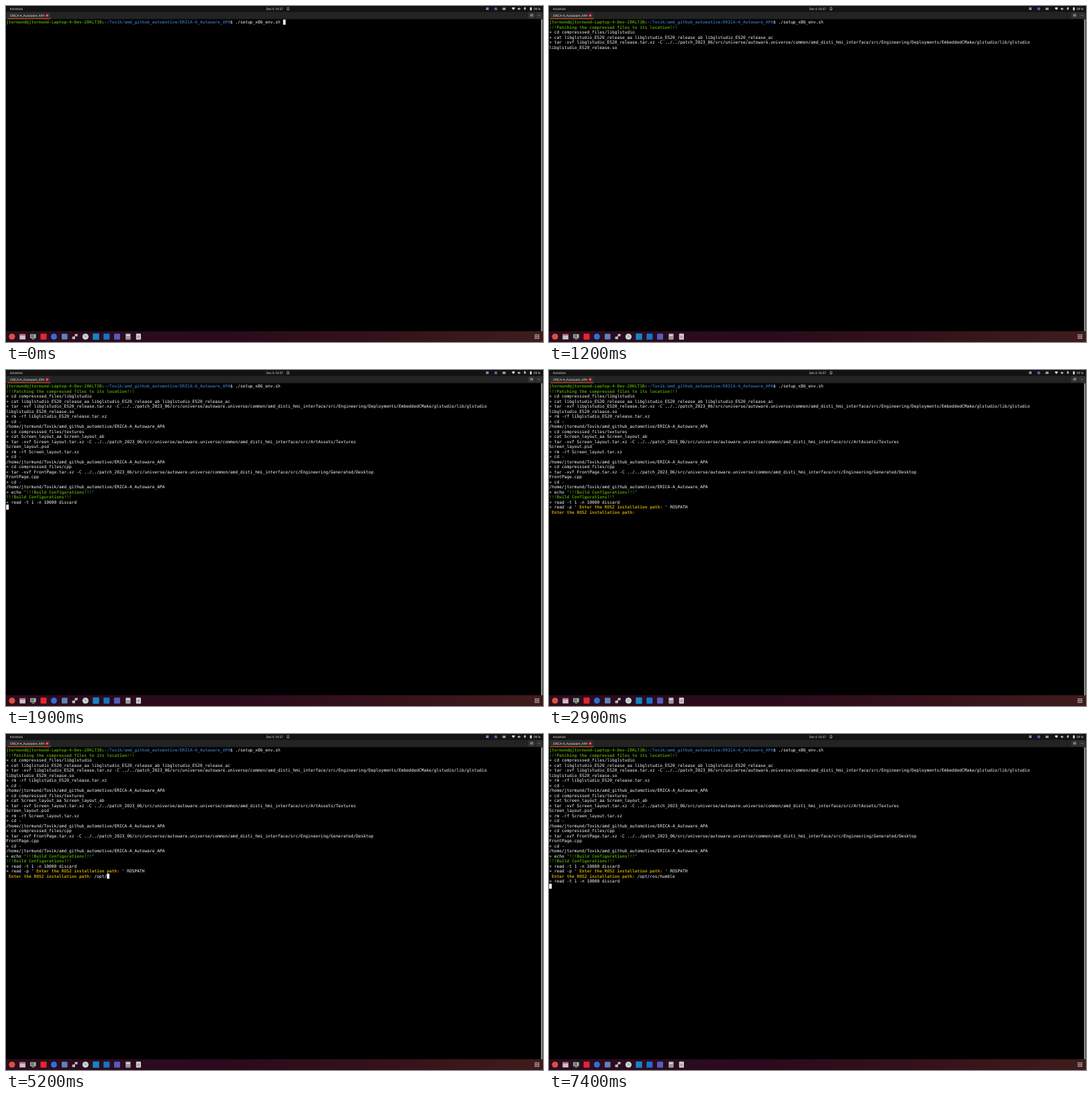
Animation of 800 by 500 pixels, one loop 8000 ms. Source, as an HTML page:

```html
<!DOCTYPE html>
<html lang="en">
<head>
<meta charset="utf-8">
<title>Terminal setup</title>
<style>
  html, body { margin: 0; width: 100%; height: 100%; overflow: hidden; background: #000; }
  svg { display: block; width: 100vw; height: 100vh; }
  text { white-space: pre; text-rendering: geometricPrecision; }
  .term { font: 19.932px "DejaVu Sans Mono", monospace; fill: #fff; }
  .ui { font: 4.65px "Noto Sans", "Open Sans", sans-serif; fill: #e6e6e6; }
  .g, .b, .y { font-weight: bold; }
  .g { fill: #4e9a06; }
  .b { fill: #3465a4; }
  .y { fill: #c4a000; }
</style>
</head>
<body>
<svg viewBox="0 0 800 500">
  <defs>
    <linearGradient id="dock">
      <stop offset="0" stop-color="#2c0c20"/>
      <stop offset=".4" stop-color="#2a0a1c"/>
      <stop offset=".7" stop-color="#35121a"/>
      <stop offset="1" stop-color="#3f1c1b"/>
    </linearGradient>
  </defs>
  <rect width="800" height="500"/>

  <g id="topbar">
    <rect width="800" height="8.5" fill="#131313"/>
    <text class="ui" x="5.7" y="5.9">Activities</text>
    <text class="ui" x="387.6" y="5.9">Dec 6 10:57</text>
    <path d="M418.8 5.4V2.6q1.4-1.4 2.8 0v2.8zM419.6 6.3h1.2" fill="none" stroke="#ddd" stroke-width=".6"/>
    <rect x="715" y="2.2" width="4" height="3.8" fill="#8185b0"/>
    <circle cx="729.7" cy="4.2" r="2.2" fill="#5b60b5"/>
    <rect x="739.7" y="2.5" width="4.6" height="3.4" fill="#9aa39f"/>
    <path d="M753.4 3q2.5-1.8 5 0l-2.5 3z" fill="#eee"/>
    <path d="M762.5 3.4h1l1.4-1.2v4l-1.4-1.2h-1z" fill="#eee"/>
    <path d="M765.8 2.9q1 1.3 0 2.6" fill="none" stroke="#eee" stroke-width=".6"/>
    <path d="M772.3 2h1.4v2.6h-1.4zM771.4 4q1.6 2.4 3.2 0M773 5.3v1" fill="#eee" stroke="#eee" stroke-width=".4"/>
    <path d="M780.7 2.3h.7v-.6h1v.6h.7v4.2h-2.4z" fill="#eee"/>
    <text class="ui" x="786" y="5.9">99 %</text>
  </g>

  <g id="titlebar">
    <rect y="8.5" width="800" height="11" fill="#232323"/>
    <rect x="2" y="9" width="64.5" height="10.5" fill="#2c2c2c"/>
    <rect y="19" width="800" height=".6" fill="#151515"/>
    <rect x="2" y="18.5" width="64.5" height="1" fill="#e95420"/>
    <text class="ui" x="6.3" y="15.7">ERICA-A_Autoware_APA</text>
    <circle cx="61.3" cy="14.2" r="2.4" fill="#d3202c"/>
    <path d="M60.5 13.4l1.6 1.6m0-1.6l-1.6 1.6" stroke="#fff" stroke-width=".5"/>
    <g fill="#303030" stroke="#454545" stroke-width=".4">
      <rect x="778.3" y="9.8" width="9.4" height="8.6" rx="1"/>
      <rect x="789.6" y="9.8" width="9" height="8.6" rx="1"/>
    </g>
    <path d="M781.4 15.6v-3.2h3.4v3.2m-2.6 0v-1.6h1.8v1.6M792.8 13.5l1.3 1.3 1.3-1.3" fill="none" stroke="#ccc" stroke-width=".6"/>
  </g>

  <rect id="scrollbar" x="797" y="19.7" width="2.5" height="464.3" fill="#8f8f8f"/>

  <g class="term" transform="translate(.3 20.3) scale(.3125)">
    <g id="rows"></g>
    <rect id="cursor" width="12" height="24"/>
  </g>

  <rect y="484" width="800" height="16" fill="url(#dock)"/>
  <g id="icons">
    <circle cx="9" cy="492" r="4.6" fill="#d9503f"/>
    <path d="M20.3 488.2h8.6v8h-8.6z" fill="#c9c3c3"/>
    <path d="M20.3 488.2h8.6v2.2h-8.6z" fill="#b0606a"/>
    <path d="M36 488.4h8.6v6H36z" fill="#b4bdb2"/>
    <path d="M37 489.3h5v4h-5z" fill="#4c8a4e"/>
    <path d="M38.5 495h4v1.4h-4z" fill="#888"/>
    <rect x="51.5" y="487.5" width="9" height="9" rx="1" fill="#e5252f"/>
    <circle cx="71.4" cy="492" r="4.5" fill="#2f6fd6"/>
    <rect x="83" y="487.7" width="8.6" height="8.6" rx="1" fill="#5f83b4"/>
    <path d="M102.6 488h4v3.6h-4zM98.6 492h4.4v3.8h-4.4z" fill="#b8bcc4"/>
    <path d="M100.5 492.5l3-2.2" stroke="#d6c44a" stroke-width=".8"/>
    <circle cx="118.4" cy="492" r="4.6" fill="#c8d4d6"/>
    <path d="M118.4 492l-1.8-1.8m1.8 1.8l2-1" stroke="#4c7078" stroke-width=".7"/>
    <rect x="129.3" y="487.3" width="9.4" height="9.4" fill="#1686c4"/>
    <rect x="145.3" y="487.6" width="9" height="9" rx="1" fill="#1873c9"/>
    <rect x="161" y="487.6" width="9" height="9" rx="1" fill="#555cb9"/>
    <rect x="178.2" y="487.6" width="7.4" height="8.8" rx=".8" fill="#aaa7a7"/>
    <path d="M179.4 489h5v1.8h-5z" fill="#ddd"/>
    <path d="M179.4 492.6h5m-5 2h5" stroke="#666" stroke-width=".9" stroke-dasharray="1 1"/>
    <rect x="193.8" y="487.6" width="7.2" height="8.8" rx=".9" fill="#d2d0d0"/>
    <circle cx="197.4" cy="492.4" r="1.5" fill="none" stroke="#666" stroke-width=".8"/>
    <path d="M787.8 489.6h7m-7 2.5h7m-7 2.5h7" stroke="#eee" stroke-width="1.5" stroke-dasharray="1.5 1"/>
  </g>
</svg>

<script>
const LOOP = 8000, CELL = 12, LINE = 24;
const user = 'jtormund', host = user + '-Laptop-4-Dev-20KLT3B';
const project = 'Tovik/amd_github_automotive/ERICA-A_Autoware_APA';
const patch = '-C ../../patch_2023_06/src/universe/autoware.universe/common/amd_disti_hmi_interface/src/';
const home = `/home/${user}/${project}`;
const lib = 'libglstudio_ES20_release';
const discard = '+ read -t 1 -n 10000 discard';
const question = ' Enter the ROS2 installation path: ';

const span = (cls, text) => `<tspan class="${cls}">${text}</tspan>`;
const build = span('g', '!!!Build Configurations!!!');

// Output arrives in bursts: [time, rows]
const bursts = [
  [0, [span('g', `${user}@${host}`) + ':' + span('b', `~/${project}`) + '$ ./setup_x86_env.sh']],
  [700, [
    span('g', '!!!Patching the compressed files to its location!!!'),
    '+ cd compresssed_files/libglstudio',
    `+ cat ${lib}_aa ${lib}_ab ${lib}_ac`,
    `+ tar -xvf ${lib}.tar.xz ${patch}Engineering/Deployments/EmbeddedCMake/glstudio/lib/glstudio`,
    `${lib}.so`]],
  [1400, [
    `+ rm -rf ${lib}.tar.xz`,
    '+ cd -',
    home,
    '+ cd compresssed_files/textures',
    '+ cat Screen_layout_aa Screen_layout_ab',
    `+ tar -xvf Screen_layout.tar.xz ${patch}ArtAssets/Textures`,
    'Screen_layout.psd']],
  [1900, [
    '+ rm -rf Screen_layout.tar.xz',
    '+ cd -',
    home,
    '+ cd compresssed_files/cpp',
    `+ tar -xvf FrontPage.tar.xz ${patch}Engineering/Generated/Desktop`,
    'FrontPage.cpp',
    '+ cd -',
    home,
    `+ echo '${build}'`,
    build,
    discard]],
  [2900, [
    `+ read -p '${span('y', question)}' ROSPATH`,
    span('y', question)]],
  [7400, [discard]]
];

// Keystrokes: [time, characters of the answer typed so far]
const answer = '/opt/ros/humble';
const keys = [[0, 0], [3600, 1], [4400, 3], [4500, 4], [5000, 5], [5800, 6], [5900, 8],
  [6000, 9], [6400, 10], [6500, 11], [6600, 12], [7000, 13], [7100, 14], [7300, 15]];
const hidden = [[100, 700], [1200, 1900], [2400, 3000], [4200, 4400], [5600, 5800]];

const rowsEl = document.getElementById('rows');
const cursor = document.getElementById('cursor');
const allRows = bursts.flatMap(([time, rows]) => rows.map(text => ({ time, text })));
const answerRow = 25;

rowsEl.innerHTML = allRows.map(({ text }, i) =>
  `<text y="${i * LINE + 19}">${text}${i === answerRow ? '<tspan id="answer"></tspan>' : ''}</text>`).join('');
const answerEl = document.getElementById('answer');

function draw(t) {
  const shown = allRows.filter(row => row.time <= t).length;
  const typed = keys.filter(key => key[0] <= t).pop()[1];
  [...rowsEl.children].forEach((el, i) => el.setAttribute('visibility', i < shown ? 'visible' : 'hidden'));
  answerEl.textContent = answer.slice(0, typed);

  let col = 0, row = shown;
  if (shown === 1) [col, row] = [110, 0];
  if (shown === answerRow + 1) [col, row] = [question.length + typed, answerRow];
  cursor.setAttribute('x', col * CELL);
  cursor.setAttribute('y', row * LINE);
  const off = hidden.some(([from, to]) => t >= from && t < to);
  cursor.setAttribute('visibility', off ? 'hidden' : 'visible');
}

const start = performance.now();
function tick() {
  draw((performance.now() - start) % LOOP);
  requestAnimationFrame(tick);
}
tick();
</script>
</body>
</html>
```
